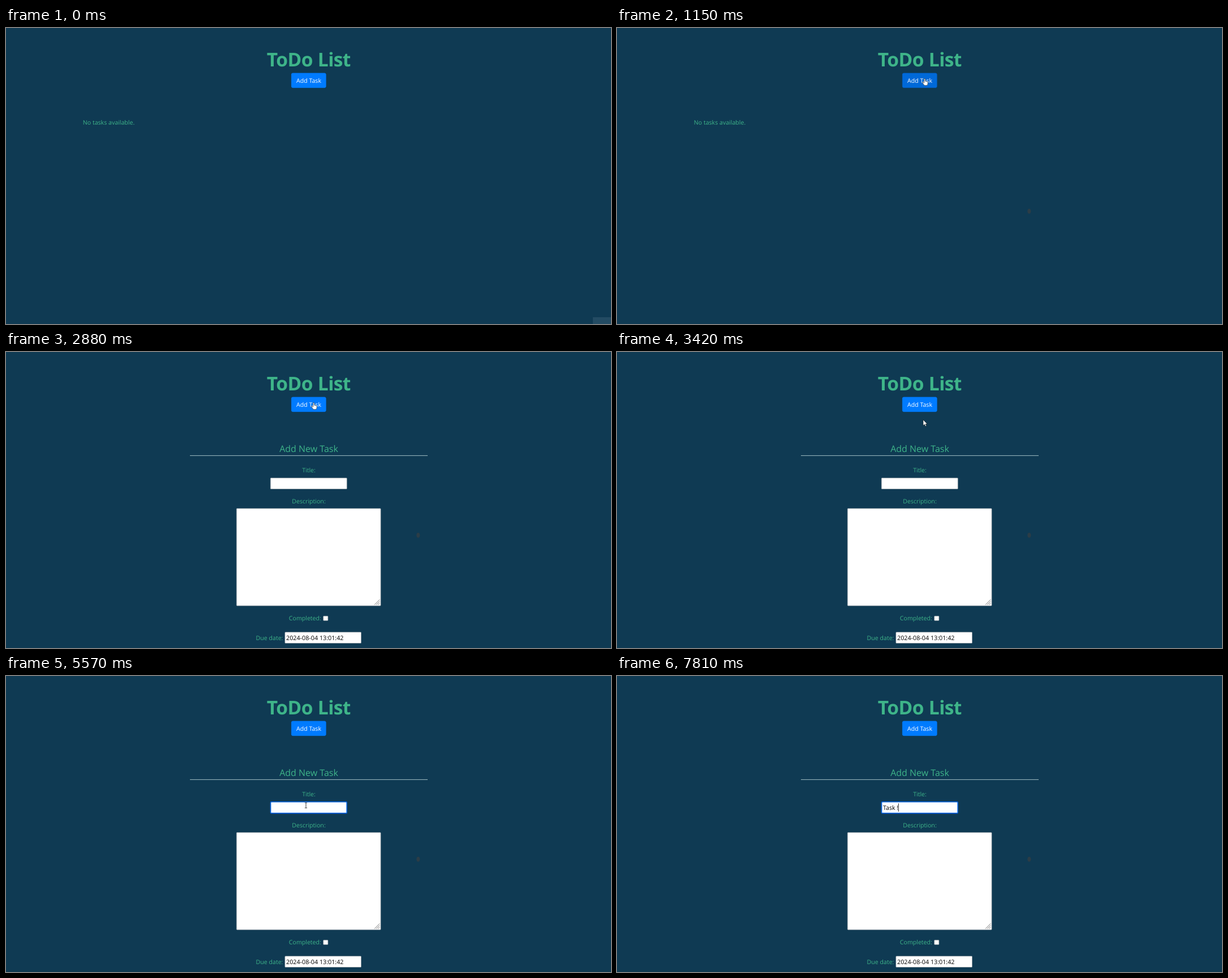
Write an HTML page that moves like this. It is 1069 by 524 pixels and loops after 8000 ms.

```html
<!DOCTYPE html>
<html lang="en">
<head>
<meta charset="utf-8">
<title>ToDo List</title>
<style>
  html, body { margin: 0; width: 100%; height: 100%; overflow: hidden; background: #0f3a53; }
  svg { display: block; width: 1069px; height: 524px; }
  text {
    font: 10.6px "Open Sans", "Noto Sans", sans-serif;
    fill: #3eb489;
    text-rendering: geometricPrecision;
    white-space: pre;
  }
  .mid { text-anchor: middle; }
  .h1 { font-size: 33.6px; font-weight: 700; letter-spacing: -.65px; word-spacing: 1px; }
  .h2 { font-size: 16px; }
  .ink { fill: #000; }
  .field { fill: #fff; stroke: #8b959c; stroke-width: .7; }

  /* every part shares the same 8 s clock and holds each key until the next */
  .a { animation: 8s step-end infinite; }
  .badge { animation-name: badge; }
  .empty { animation-name: empty; }
  .form { animation-name: form; }
  .btn { animation-name: btn; }
  .ring { animation-name: ring; }
  .mark { animation-name: mark; }
  .focus { animation-name: focus; }
  .caret { animation-name: caret; }
  .popup { animation-name: popup; }
  .k1 { animation-name: k1; }
  .k2 { animation-name: k2; }
  .k3 { animation-name: k3; }
  .k4 { animation-name: k4; }
  .k5 { animation-name: k5; }
  .cursor { animation-name: move; }
  .arrow { animation-name: arrow; }
  .hand { animation-name: hand; }
  .beam { animation-name: beam; }
  .click { animation-name: click; }

  @keyframes badge { 0% { opacity: 1 } .875%, 100% { opacity: 0 } }
  @keyframes empty { 0% { opacity: 1 } 36%, 100% { opacity: 0 } }
  @keyframes form { 0% { opacity: 0 } 36%, 100% { opacity: 1 } }
  @keyframes mark { 0% { opacity: 0 } 10.05%, 100% { opacity: 1 } }
  @keyframes focus { 0% { opacity: 0 } 49.5%, 100% { opacity: 1 } }
  @keyframes popup { 0% { opacity: 0 } 73.625% { opacity: 1 } 97.625%, 100% { opacity: 0 } }

  @keyframes btn {
    0% { fill: #007bff; stroke: #007bff }
    13.5% { fill: #0069d9; stroke: #0062cc }
    32.625% { fill: #0062cc; stroke: #005cbf }
    36% { fill: #007bff; stroke: #007bff }
    36.875% { fill: #0072ec; stroke: #006fe6 }
    37.75% { fill: #0069d9; stroke: #0062cc }
    41.85% { fill: #0072ec; stroke: #006fe6 }
    42.71%, 100% { fill: #007bff; stroke: #007bff }
  }
  @keyframes ring {
    0% { opacity: 0 }
    32.625% { opacity: .5 }
    33.5% { opacity: 1 }
    36%, 100% { opacity: 0 }
  }

  /* typing */
  @keyframes k1 { 0% { opacity: 0 } 72%, 100% { opacity: 1 } }
  @keyframes k2 { 0% { opacity: 0 } 75.375%, 100% { opacity: 1 } }
  @keyframes k3 { 0% { opacity: 0 } 82%, 100% { opacity: 1 } }
  @keyframes k4 { 0% { opacity: 0 } 84.5%, 100% { opacity: 1 } }
  @keyframes k5 { 0% { opacity: 0 } 96.875%, 100% { opacity: 1 } }
  @keyframes caret {
    0% { opacity: 0; transform: none }
    49.5% { opacity: 1; transform: none }
    56.25% { opacity: 0; transform: none }
    63% { opacity: 1; transform: none }
    69.625% { opacity: 0; transform: none }
    72% { opacity: 1; transform: translateX(5px) }
    75.375% { opacity: 1; transform: translateX(11px) }
    82% { opacity: 1; transform: translateX(16px) }
    84.5% { opacity: 1; transform: translateX(20.7px) }
    89.5% { opacity: 1; transform: translateX(23.5px) }
    96.875%, 100% { opacity: 1; transform: translateX(26.5px) }
  }

  /* pointer */
  @keyframes move {
    0% { transform: translate(990px, 501px) }
    4% { transform: translate(990px, 501px); animation-timing-function: steps(3) }
    6.59% { transform: translate(893px, 440px); animation-timing-function: steps(3) }
    9.18% { transform: translate(725px, 319px); animation-timing-function: steps(3) }
    11.77% { transform: translate(600px, 175px); animation-timing-function: steps(2) }
    13.5% { transform: translate(542.6px, 89px) }
    40.14% { transform: translate(542.6px, 89px); animation-timing-function: steps(3) }
    42.71% { transform: translate(541px, 120px); animation-timing-function: steps(2) }
    44.43% { transform: translate(535px, 190px); animation-timing-function: steps(3) }
    47%, 100% { transform: translate(530px, 229px) }
  }
  @keyframes arrow {
    0% { opacity: 0 }
    4% { opacity: 1 }
    14.375% { opacity: 0 }
    35.125% { opacity: 1 }
    36% { opacity: 0 }
    41.85% { opacity: 1 }
    47%, 100% { opacity: 0 }
  }
  @keyframes hand {
    0% { opacity: 0 }
    14.375% { opacity: 1 }
    35.125% { opacity: 0 }
    36% { opacity: 1 }
    41.85%, 100% { opacity: 0 }
  }
  @keyframes beam { 0% { opacity: 0 } 47% { opacity: 1 } 72%, 100% { opacity: 0 } }
  @keyframes click {
    0% { opacity: 0 }
    32.625% { opacity: .85 }
    34.25% { opacity: 0 }
    49.5% { opacity: .85 }
    51.125%, 100% { opacity: 0 }
  }
</style>
</head>
<body>
<svg viewBox="0 0 1069 524">
  <rect width="1069" height="524" fill="#0f3a53"/>
  <rect class="a badge" x="1037" y="512" width="32" height="12" fill="#234b63"/>

  <text class="mid h1" x="534.8" y="68.2">ToDo List</text>
  <rect class="a ring" x="501.8" y="77.4" width="66" height="30.8" rx="4.5" fill="#268fff" fill-opacity=".5"/>
  <rect class="a btn" x="504.35" y="79.95" width="60.9" height="25.7" rx="2.4" fill="#007bff" stroke="#007bff" stroke-width=".7"/>
  <text class="mid" x="535" y="97.3" style="fill:#fff">Add Task</text>

  <text class="a empty" x="135.8" y="170.8">No tasks available.</text>

  <g class="a form">
    <text class="mid h2" x="535" y="177">Add New Task</text>
    <path d="M325 183.4H745" stroke="#a3c0c4" stroke-width="1"/>

    <text class="mid" x="535" y="213.3">Title:</text>
    <rect class="field" x="467.3" y="223" width="135" height="19.6" rx="1"/>
    <rect class="a focus" x="467.6" y="222.7" width="134.6" height="20.2" rx="1.2" fill="none" stroke="#0060df" stroke-width="1.6"/>
    <text class="ink" x="470" y="237.3"><tspan class="a k1">T</tspan><tspan class="a k2">a</tspan><tspan class="a k3">s</tspan><tspan class="a k4">k </tspan><tspan class="a k5">!</tspan></text>
    <path class="a caret" d="M470.5 225.5V240" stroke="#000" stroke-width=".8"/>

    <text class="mid" x="535" y="267.8">Description:</text>
    <rect class="field" x="407.3" y="277" width="254.8" height="172.2" rx="1"/>
    <path d="M651 447.5L660.3 438.2M654.2 447.5L660.3 441.4M657.4 447.5L660.3 444.6" stroke="#555" stroke-width=".8"/>

    <text x="499.8" y="474.8">Completed:</text>
    <rect class="field" x="560.7" y="467.4" width="8.2" height="8.2" rx="1"/>

    <text x="441.6" y="509.8">Due date:</text>
    <rect class="field" x="492.9" y="495.9" width="134.6" height="19.6" rx="1"/>
    <text class="ink" x="495" y="510" style="font-size:10.75px">2024-08-04 13:01:42</text>

    <g class="a popup">
      <rect x="467.3" y="244.3" width="135" height="16.2" fill="#fff" stroke="#c4c8cc" stroke-width=".6"/>
      <text class="ink" x="470.5" y="255.7" style="font-size:9px">Task 1</text>
    </g>
  </g>

  <ellipse class="a mark" cx="728.3" cy="324.3" rx="3" ry="4.4" fill="#2b3d47"/>

  <g class="a cursor">
    <circle class="a click" cx="-.8" cy="-.2" r="8.6" fill="#f6e71f"/>
    <path class="a arrow" d="M0 0V10.2L2.4 8 4 11.6 5.7 10.8 4.1 7.4H7.2Z" fill="#fff" stroke="#111" stroke-width=".6"/>
    <path class="a hand" d="M0 1.6Q0 .5 1 .5T2 1.6V5.2Q3 4.6 3.7 5.5 4.6 5 5.2 5.9 6.6 5.6 6.6 7V9.4Q6.6 12.8 3.8 12.8H1.6Q.4 12.8-.6 11.2L-3 7.8Q-3.3 6.6-2.2 6.6L0 8.2Z" fill="#fff" stroke="#111" stroke-width=".6"/>
    <path class="a beam" d="M-2-4.6H-.5L0-4.2.5-4.6H2M0-4.2V4.2M-2 4.6H-.5L0 4.2.5 4.6H2" fill="none" stroke="#222" stroke-width=".9"/>
  </g>
</svg>
</body>
</html>
```
